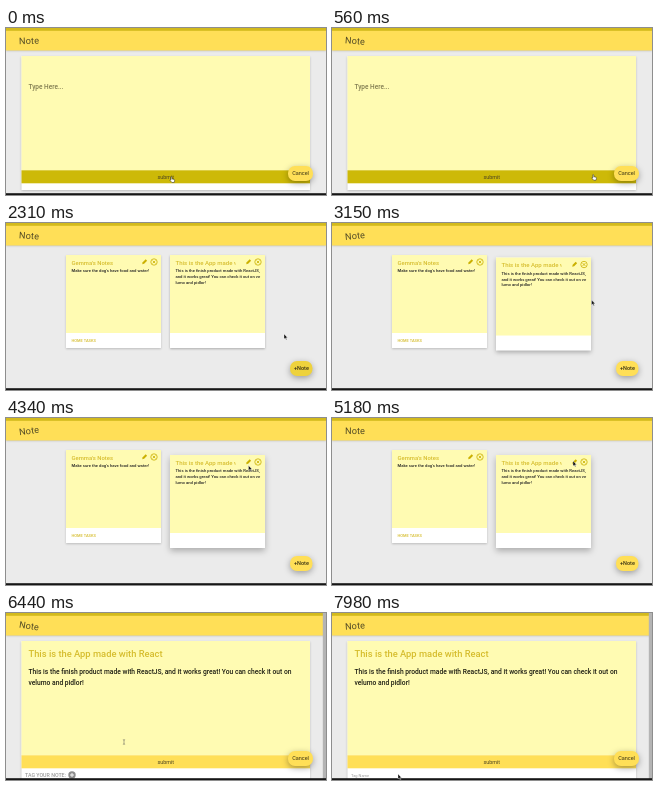
Recreate the animation shown at these times as an HTML page. Size 320 px wide and 167 px high, loop 8 s.

```html
<!DOCTYPE html>
<html lang="en">
<head>
<meta charset="utf-8">
<title>Notes</title>
<style>
  html, body { margin: 0; width: 100%; height: 100%; overflow: hidden; background: #ebebeb; }
  svg { display: block; width: 100vw; height: 100vh; }
  text { font-family: Roboto, Arial, sans-serif; white-space: pre; }
  .medium { font-weight: 500; }
  .gold { fill: #d6bd2e; }
  .icon { fill: none; stroke: #cbb000; stroke-width: .8; }
  .lift { filter: drop-shadow(0 1px 1.2px #0003); }
  .float { filter: drop-shadow(0 2px 3px #0005); }
</style>
</head>
<body>
<svg viewBox="0 0 320 167" preserveAspectRatio="none">
  <defs>
    <clipPath id="titleClip"><rect x="165" y="32" width="64.5" height="15"/></clipPath>
    <g id="tools">
      <path d="M136.2 41.2l.5-1.9 3-3 1.4 1.4-3 3z" fill="#cbb000"/>
      <g class="icon"><circle cx="148" cy="39" r="3.2"/><path d="M146.6 37.6l2.8 2.8m0-2.8l-2.8 2.8"/></g>
    </g>
    <g id="paper">
      <rect width="95" height="93" fill="#fff"/>
      <rect width="95" height="78" fill="#fffbb2"/>
    </g>
  </defs>

  <rect width="320" height="167" fill="#ebebeb"/>

  <g id="cards">
    <g class="lift">
      <use href="#paper" x="60" y="32"/>
      <use href="#tools"/>
      <text class="medium gold" x="65.5" y="41.8" font-size="5.9">Gemma's Notes</text>
      <text class="medium" x="65.5" y="49.4" font-size="4.2" fill="#222">Make sure the dog's have food and water!</text>
      <text class="medium gold" x="65.5" y="119.4" font-size="4">HOME TASKS</text>
    </g>
    <g id="second" class="lift">
      <use href="#paper" x="164" y="32"/>
      <use href="#tools" x="104"/>
      <text class="medium gold" x="169.5" y="41.8" font-size="6.05" clip-path="url(#titleClip)">This is the App made with React</text>
      <g class="medium" font-size="4.2" fill="#222">
        <text x="169.5" y="49.4">This is the finish product made with ReactJS,</text>
        <text x="169.5" y="55.1">and it works great! You can check it out on ve</text>
        <text x="169.5" y="60.8">lumo and pidlor!</text>
      </g>
    </g>
  </g>

  <g id="form">
    <g class="lift">
      <rect id="sheet" x="15.5" y="28" width="288.5" fill="#fff"/>
      <rect x="15.5" y="28" width="288.5" height="114.5" fill="#fffbb2"/>
    </g>
    <rect id="submit" x="15.5" y="142.3" width="288.5" height="13"/>
    <text x="159.7" y="150.7" font-size="5.4" fill="#4b4422" text-anchor="middle">submit</text>
    <text id="hint" class="medium" x="22.5" y="61" font-size="6.5" fill="#807c50">Type Here...</text>
    <g id="filled">
      <text class="medium gold" x="22.5" y="43.6" font-size="9.35">This is the App made with React</text>
      <g class="medium" font-size="6.7" fill="#1d1d12">
        <text x="22.5" y="60.6">This is the finish product made with ReactJS, and it works great! You can check it out on</text>
        <text x="22.5" y="71.7">velumo and pidlor!</text>
      </g>
    </g>
    <g id="tagLabel">
      <text class="medium" x="19" y="164" font-size="5.3" fill="#9b9b9b">TAG YOUR NOTE:</text>
      <circle cx="66" cy="162" r="3.7" fill="#8c8c8c"/>
      <path d="M64 162h4m-2-2v4" stroke="#fff" stroke-width=".9"/>
    </g>
    <text id="tagField" x="19" y="164.2" font-size="4" fill="#999">Tag Name</text>
  </g>

  <g style="filter: drop-shadow(0 .8px 1px #0004)">
    <rect width="320" height="22.5" fill="#ffdf57"/>
  </g>
  <rect width="320" height="2.8" fill="#d3ba1c"/>
  <text id="brand" x="13" y="16" font-size="9.2" letter-spacing=".1" fill="#544c26">Note</text>

  <g class="float"><rect id="pill" y="138" height="15" rx="7"/></g>
  <text id="pillText" y="147.4" font-size="5.5" fill="#3b3414" text-anchor="middle"></text>

  <rect id="scrollbar" x="316.8" width="3.2" height="166" fill="#b4b4b4"/>
  <rect y="165.2" width="320" height="2" fill="#161616"/>

  <g id="pointer">
    <path id="arrow" d="M0 0v5l1.2-1 .9 1.8.8-.4-.9-1.7h1.6z" fill="#111" stroke="#fff" stroke-width=".35"/>
    <path id="hand" d="M0 0q.7-.4 1 .3v1.6l2.3.6q.5.3.3 1.3l-.5 1.7h-2.2l-1.9-2.2q0-.7.6-.5l.4.3z" fill="#fff" stroke="#222" stroke-width=".5"/>
    <path id="beam" d="M-1.1-2.4q1.1 0 1.1.8v3.2q0 .8-1.1.8m2.2-4.8q-1.1 0-1.1.8m0 3.2q0 .8 1.1.8" fill="none" stroke="#555" stroke-width=".5"/>
  </g>
</svg>
<script>
  const LOOP = 8000, LIST_AT = 1540, EDIT_AT = 5200, TAG_AT = 7300;
  const SWING = 5000, SWING_START = 150;
  const LIGHT = [255, 223, 87], DARK = [205, 185, 8];
  // Pointer stops: time, x, y
  const path = [
    [0, 165, 149], [70, 165, 149], [800, 293, 146], [1050, 295, 145], [1790, 295, 145],
    [2300, 278, 111], [2600, 278, 111], [3600, 246, 52], [4340, 242.5, 47.5],
    [4800, 241, 43], [5350, 241, 43], [6160, 118, 129],
    [6460, 118, 129], [6930, 66, 161], [LOOP, 66, 161]
  ];

  const $ = id => document.getElementById(id);
  const clamp = v => Math.max(0, Math.min(1, v));
  const ease = v => { v = clamp(v); return v * v * (3 - 2 * v); };
  const show = (id, on) => $(id).setAttribute('display', on ? 'inline' : 'none');
  const set = (id, name, value) => $(id).setAttribute(name, value);
  const blend = k => `rgb(${LIGHT.map((c, i) => Math.round(c + (DARK[i] - c) * k))})`;

  function pointerAt(t) {
    const i = Math.max(1, path.findIndex(p => p[0] > t));
    const [a, b] = [path[i - 1], path[i]];
    const k = ease((t - a[0]) / (b[0] - a[0]));
    return [a[1] + (b[1] - a[1]) * k, a[2] + (b[2] - a[2]) * k];
  }

  function draw(t) {
    const list = t >= LIST_AT && t < EDIT_AT;
    const edit = t >= EDIT_AT;
    const [x, y] = pointerAt(t);

    const tilt = 9 * Math.sin((t - SWING_START) / SWING * 2 * Math.PI);
    set('brand', 'transform', `rotate(${tilt} 23 13)`);

    show('cards', list);
    show('form', !list);
    show('hint', !edit);
    show('filled', edit);
    show('scrollbar', edit);
    show('tagLabel', edit && t < TAG_AT);
    show('tagField', t >= TAG_AT);
    set('sheet', 'height', edit ? 139 : 134);

    const lift = ease((t - 3000) / 300);
    set('second', 'transform', `translate(0 ${5 * lift})`);
    $('second').style.filter =
      `drop-shadow(0 ${1 + 2 * lift}px ${1.2 + 2 * lift}px #0004)`;

    set('submit', 'fill', blend(1 - ease((t - 600) / 180)));
    const hover = ease((t - 630) / 180) * (1 - ease((t - 2100) / 350));
    set('pill', 'fill', blend(hover));
    set('pill', 'x', list ? 284 : 282);
    set('pill', 'width', list ? 22.5 : 25);
    set('pillText', 'x', list ? 295.4 : 294.6);
    set('pillText', 'font-weight', list ? 500 : 400);
    $('pillText').textContent = list ? '+Note' : 'Cancel';

    const beam = edit && y < 142;
    const hand = t < 1900;
    set('pointer', 'transform', `translate(${x} ${y})`);
    show('beam', beam);
    show('hand', hand);
    show('arrow', !beam && !hand);
  }

  const start = performance.now();
  function tick() {
    draw((performance.now() - start) % LOOP);
    requestAnimationFrame(tick);
  }
  draw(0);
  requestAnimationFrame(tick);
</script>
</body>
</html>
```
